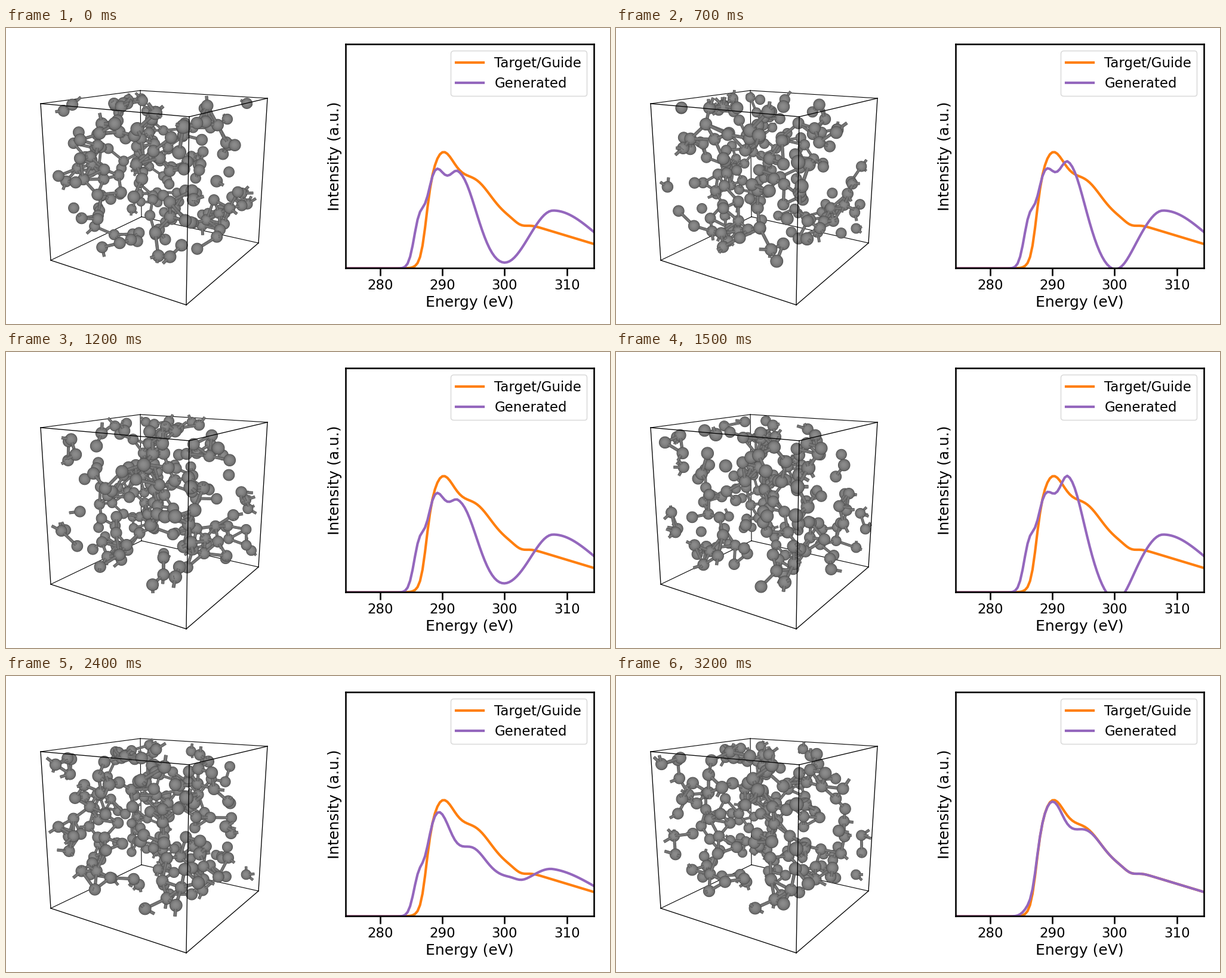
A matplotlib script that plays this animation: 1012x497 px, repeating every 3700 ms.

```python
import numpy as np
import matplotlib.pyplot as plt
from matplotlib.animation import FuncAnimation
from matplotlib.collections import PolyCollection

W, H, DPI = 1012, 497, 100
FRAMES, LAST = 37, 32
N_ATOMS = 185
BOND, CUTOFF, MIN_GAP = 0.13, 0.155, 0.11   # in cell lengths
FRONT_R = 12.0     # atom radius in pixels at the nearest box edge
rng = np.random.default_rng(11)

# ---- box and camera -------------------------------------------------------
# Corners run left, back, right, front; first the top face, then the bottom.
CORNERS = np.array([(58, 127), (225, 105), (438, 118), (307, 149),
                    (75, 390), (227, 317), (423, 361), (302, 465)], float)
CUBE = np.array([(x, y, z) for z in (1, 0)
                 for x, y in ((0, 0), (0, 1), (1, 1), (1, 0))], float)
REAR = [(0, 1), (1, 2), (1, 5), (4, 5), (5, 6)]
FRONT = [(0, 3), (2, 3), (0, 4), (2, 6), (3, 7), (4, 7), (6, 7)]
# Part of the box that the atoms fill
LOW, HIGH = np.array([0.03, 0.02, 0.12]), np.array([0.98, 0.97, 1.0])


def fit_camera():
    """Least-squares 3x4 projection taking the unit cube to the corners."""
    rows = []
    for p, (u, v) in zip(CUBE, CORNERS / 500):
        q = np.append(p, 1)
        rows.append(np.concatenate([q, np.zeros(4), -u * q]))
        rows.append(np.concatenate([np.zeros(4), q, -v * q]))
    cam = np.linalg.svd(np.array(rows))[2][-1].reshape(3, 4)
    cam = np.diag([500, 500, 1]) @ cam
    return cam / (cam[2] @ [1, 0, 0.5, 1])   # depth 1 on the front edge


CAM = fit_camera()


def project(cell):
    """Pixel positions and depths of points given in cell coordinates."""
    p = LOW + cell * (HIGH - LOW)
    q = p @ CAM[:, :3].T + CAM[:, 3]
    return q[:, :2] / q[:, 2:], q[:, 2]


# ---- atom motion ----------------------------------------------------------
def wrap(d):
    return d - np.round(d)


def grow_network(seeds):
    """Periodic network grown bond by bond from scattered seed atoms."""
    atoms = rng.random((seeds, 3))
    while len(atoms) < N_ATOMS:
        step = rng.normal(size=(60, 3))
        step *= BOND / np.linalg.norm(step, axis=1, keepdims=True)
        spots = (atoms[rng.integers(len(atoms), size=60)] + step) % 1
        gap = np.linalg.norm(wrap(spots[:, None] - atoms), axis=2)
        score = abs((gap < CUTOFF).sum(1) - 2) + 5 * (gap < MIN_GAP).sum(1)
        atoms = np.vstack([atoms, spots[score.argmin()]])
    return atoms


SETTLED = grow_network(70)
WAVES = rng.integers(-2, 3, (6, 3)) + 0.0
WAVES[~WAVES.any(axis=1)] = (1, -1, 2)
HEADING = WAVES / np.linalg.norm(WAVES, axis=1, keepdims=True)
PHASE = rng.uniform(0, 2 * np.pi, 6)
SWAY = rng.uniform(0, 2 * np.pi, (N_ATOMS, 3))
SWAY_RATE = rng.uniform(0.25, 0.7, (N_ATOMS, 3))


def atoms_at(i):
    """Drifting waves squeeze the atoms into clumps, then die away."""
    unrest = 1 - (i / LAST) ** 2
    wave = np.sin(2 * np.pi * SETTLED @ WAVES.T + PHASE + 0.22 * i)
    push = 0.032 * wave @ HEADING + 0.03 * np.sin(SWAY + SWAY_RATE * i)
    return (SETTLED + unrest * push) % 1


# ---- ball-and-stick drawing -----------------------------------------------
ANGLE = np.linspace(0, 2 * np.pi, 28, endpoint=False)
CIRCLE = np.column_stack([np.cos(ANGLE), np.sin(ANGLE)])
BALL = [(s, 0.28 + 0.27 * (1 - s * s) ** 0.4)
        for s in (1, .95, .87, .74, .56, .36, .18)]   # radius share, grey
STICK = [(1, .33), (.8, .42), (.42, .47)]             # width share, grey


def half_bonds(p):
    """Half sticks from every atom toward its neighbours, across walls too."""
    i, j = np.triu_indices(len(p), 1)
    d = wrap(p[j] - p[i])
    near = np.linalg.norm(d, axis=1) < CUTOFF
    i, j, d = i[near], j[near], d[near]
    base, step = np.vstack([p[i], p[j]]), np.vstack([d, -d])
    size = np.linalg.norm(step, axis=1, keepdims=True) + 1e-9
    return base + step * np.minimum(0.025 / size, 0.4), base + step / 2


def molecule(p):
    parts = []
    for c, w in zip(*project(p)):
        r = FRONT_R / w
        polys = [(c - .1 * r * (1 - s) + CIRCLE * r * s, g) for s, g in BALL]
        parts.append((w, polys))
    a, b = half_bonds(p)
    (a, wa), (b, wb) = project(a), project(b)
    for s, e, w0, w1 in zip(a, b, wa, wb):
        d = e - s
        side = np.array([-d[1], d[0]]) / (np.hypot(*d) + 1e-6)
        polys = []
        for share, g in STICK:
            n = side * share * 0.26 * FRONT_R
            polys.append((np.array([s + n / w0, e + n / w1,
                                    e - n / w1, s - n / w0]), g))
        parts.append(((w0 + w1) / 2, polys))
    parts.sort(key=lambda part: -part[0])
    flat = [poly for _, polys in parts for poly in polys]
    return [v for v, _ in flat], [(g, g, g) for _, g in flat]


# ---- spectra, heights in pixels -------------------------------------------
def energy(px):
    return 280 + (px - 626.8) / 10.43


def bump(center, left, right):
    """Gaussian with its own width on each side."""
    return np.exp(-0.5 * ((E - center) / np.where(E < center, left, right))**2)


LEFT, RIGHT, TOP, BOTTOM = 568.9, 984.9, 27, 403.5
E = np.linspace(energy(LEFT), energy(RIGHT), 101)
EDGE = 1 / (1 + np.exp(-(E - 287.3) / 0.48))
GUIDE = EDGE * (41 + 3.16 * (314.3 - E) + 68 * bump(290, 1.8, 1.8)
                + 48 * bump(295, 2.8, 2.7) - 6 * bump(302.6, 1, 1))
SHOULDER = 66 * bump(286.2, 0.85, 0.85)
EARLY = (139 * bump(288.7, 1.3, 1.5) + 150 * bump(292.6, 2, 2.9)
         + 97 * bump(307.8, 3.6, 6.8))


def spectrum_at(i):
    x = max(0, (i - 16) / 16)
    q = x * x * (3 - 2 * x)
    swing = np.interp(i, [0, 7, 12, 15, 20, 24, 32],
                      [8, 24, 0, 40, 0, -40, -14])
    early = EARLY - 0.7 * swing * bump(300.6, 2.5, 1.8)
    return ((1 - q) * early + q * GUIDE + (1 - 0.85 * q ** 3) * SHOULDER
            + swing * bump(292.5, 1.3, 1.8))


# ---- figure ---------------------------------------------------------------
plt.rcParams.update({
    "font.family": "DejaVu Sans", "axes.labelsize": 18,
    "xtick.labelsize": 16.5, "legend.fontsize": 16.5,
    "axes.linewidth": 1.875, "xtick.major.size": 9,
    "xtick.major.width": 1.875, "toolbar": "None"})
fig = plt.figure(figsize=((W + .01) / DPI, (H + .01) / DPI), dpi=DPI,
                 facecolor="white")

scene = fig.add_axes([0, 0, 1, 1])
scene.set(xlim=(0, W), ylim=(H, 0))
scene.axis("off")
for edges, width, z in ((REAR, 0.8, 1), (FRONT, 0.95, 3)):
    for a, b in edges:
        scene.plot(*CORNERS[[a, b]].T, color="black", lw=width, zorder=z)
balls = PolyCollection([], edgecolors="none", linewidths=0, zorder=2)
scene.add_collection(balls, autolim=False)

ax = fig.add_axes([LEFT / W, 1 - BOTTOM / H, (RIGHT - LEFT) / W,
                   (BOTTOM - TOP) / H])
ax.set(xlim=(E[0], E[-1]), ylim=(0, BOTTOM - TOP),
       xticks=[280, 290, 300, 310], yticks=[],
       xlabel="Energy (eV)", ylabel="Intensity (a.u.)")
ax.plot(E, GUIDE, color="tab:orange", lw=3, label="Target/Guide")
made, = ax.plot(E, spectrum_at(0), color="tab:purple", lw=3,
                label="Generated")
ax.legend(loc="upper right")


def draw(frame):
    i = min(frame, LAST)
    verts, greys = molecule(atoms_at(i))
    balls.set_verts(verts)
    balls.set_facecolor(greys)
    made.set_ydata(spectrum_at(i))
    return balls, made


anim = FuncAnimation(fig, draw, frames=FRAMES, interval=100, repeat=True,
                     repeat_delay=0, blit=False)
plt.show()
```
